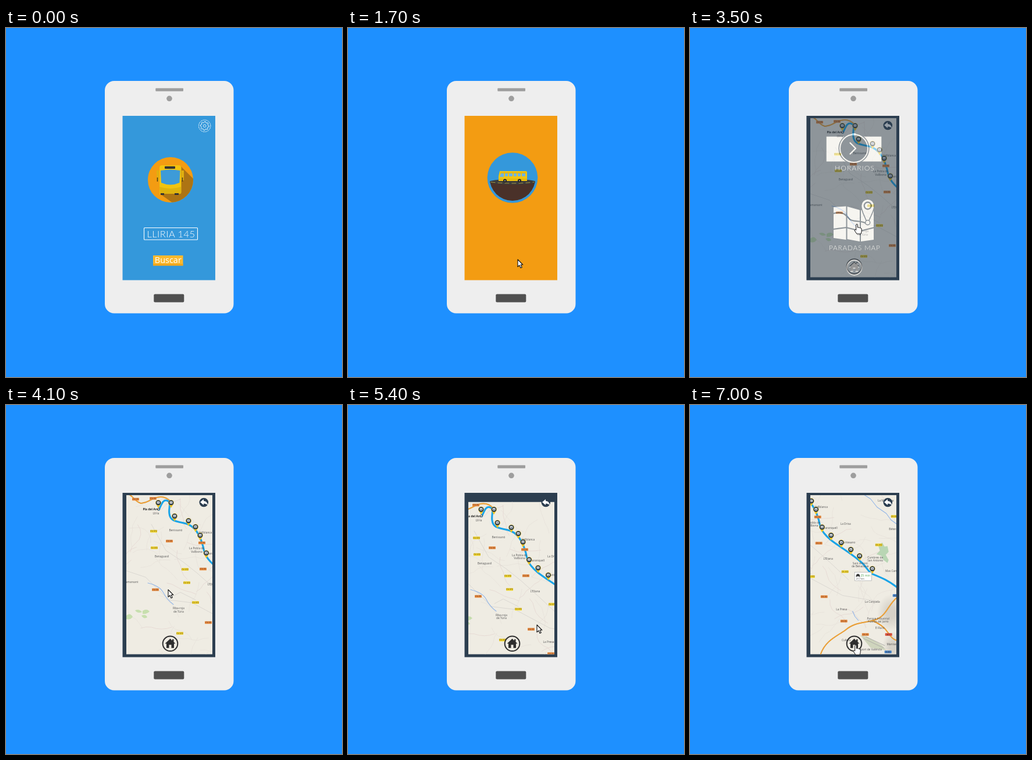
Recreate the animation shown at these times as an HTML page. Size 578x600 px, loop 7100 ms.

```html
<!DOCTYPE html>
<html lang="es">
<head>
<meta charset="utf-8">
<title>Bus app</title>
<style>
html, body { margin: 0; width: 100%; height: 100%; overflow: hidden; background: #1e90ff; }
svg { display: block; width: 100%; height: 100%; }
text { text-anchor: middle; }
.thin { font-family: Lato, sans-serif; font-weight: 300; fill: #fff; }
.place { font: 4.8px "Open Sans", sans-serif; fill: #555; }
.tag { font: 3.6px "Open Sans", sans-serif; fill: #533; }
.line { fill: none; stroke-linecap: round; stroke-linejoin: round; }
</style>
</head>
<body>
<svg viewBox="0 0 578 600">
  <defs>
    <clipPath id="badgeClip"><circle cx="283" cy="261" r="39"/></clipPath>
    <clipPath id="groundClip"><circle cx="283" cy="257.5" r="39.5"/></clipPath>
    <clipPath id="windowClip"><rect x="207" y="155" width="148" height="273.5"/></clipPath>
    <clipPath id="landClip"><rect x="190" y="155" width="300" height="340"/></clipPath>
    <radialGradient id="town">
      <stop offset=".3" stop-color="#d5d1c8"/>
      <stop offset="1" stop-color="#d5d1c8" stop-opacity="0"/>
    </radialGradient>
    <g id="house">
      <circle r="12.8" fill="none" stroke="currentColor" stroke-width="2"/>
      <path d="M-9 0L0-8.5 3.5-5.2V-7.5H6V-3L9 0H6.5V7.5H2V2H-2V7.5H-6.5V0Z" fill="currentColor"/>
    </g>
    <g id="pin">
      <path d="M-3.8 2.5L0 9 3.8 2.5Z" fill="#f5c518"/>
      <circle r="4.6" fill="#20303f" stroke="#e8c541" stroke-width=".7"/>
      <rect x="-2.4" y="-2.2" width="4.8" height="4" rx=".8" fill="#fff"/>
      <path d="M-1.6 0H1.6M-2 2.4H-1M1 2.4H2" stroke="#20303f" stroke-width="1"/>
    </g>
  </defs>

  <rect width="578" height="600" fill="#1e90ff"/>
  <rect x="170" y="91" width="221.5" height="399.5" rx="16" fill="#eee"/>
  <rect x="257.3" y="103.5" width="47.7" height="5.2" rx="1" fill="#9e9e9e"/>
  <circle cx="281" cy="121.3" r="4.8" fill="#9e9e9e"/>
  <rect x="254.3" y="457.5" width="52" height="14" rx="2" fill="#505050"/>

  <g id="home">
    <rect x="200.5" y="151" width="159.5" height="282.5" fill="#3498db"/>
    <g id="gear" transform="translate(341.7 168.3)" fill="none" stroke="#fff">
      <circle r="10.2" stroke-width=".9" stroke-dasharray="2 .8"/>
      <circle r="2.3" stroke-width=".8"/>
    </g>
    <circle cx="283" cy="261" r="39" fill="#f39c12"/>
    <path d="M300 237L345 282 300 310 266 286Z" fill="#ad7413" clip-path="url(#badgeClip)"/>
    <path d="M259 245H263V263H260ZM302 245H306V262H302Z" fill="#e0b010"/>
    <path d="M260.5 257V264M303.5 257V264" stroke="#4a3a18" stroke-width="1.5"/>
    <path d="M264 240Q264 236 269 236H297Q301.5 236 301.5 240V283Q301 285 299 285H266Q264 285 264 283Z" fill="#f1c40f"/>
    <path d="M266 245Q283 242 299.5 245L298.5 266Q283 273 267 266Z" fill="#3d9bd8"/>
    <path d="M264 273Q283 279 301 273V285H265Z" fill="#dfb40e"/>
    <rect x="273" y="237.7" width="18" height="4.3" rx="1" fill="#333"/>
    <path d="M266 284H272V287H266ZM290 284H297V287H290Z" fill="#333"/>
    <rect x="237.5" y="343.5" width="92" height="20.5" rx="1" fill="none" stroke="#fff" stroke-width="1.1"/>
    <text class="thin" x="284" y="360" font-size="16.5" letter-spacing=".4">LLIRIA 145</text>
    <rect x="253" y="391" width="51.5" height="17.5" fill="#fbb92f"/>
    <rect x="253" y="405.5" width="51.5" height="3" fill="#f0a51c"/>
    <text x="278.8" y="404" font-family="Open Sans, sans-serif" font-size="14.5" fill="#fff">Buscar</text>
  </g>

  <g id="loading">
    <rect x="200.5" y="151" width="159.5" height="282.5" fill="#f39c12"/>
    <circle cx="283" cy="257.5" r="43.3" fill="#3498db"/>
    <g clip-path="url(#groundClip)">
      <path d="M240 265H326V300H240Z" fill="#4a3129"/>
      <ellipse cx="283" cy="264.5" rx="40" ry="4.5" fill="#3c3c3c"/>
      <path d="M246 265Q283 269 320 265" class="line" stroke="#b9a23c" stroke-width=".9" stroke-dasharray="7 5"/>
      <g id="bus">
        <path d="M261 246H306Q308 246 308 249V263H259V255Z" fill="#f1c40f"/>
        <path d="M262 249H306M259 260H308" stroke="#d0a40c"/>
        <path d="M261 256L263 250H268V256ZM270 250H275V255H270ZM277 250H283V255H277ZM285 250H290V255H285ZM292 250H297V255H292ZM299 250H305V255H299Z" fill="#6fb5df"/>
        <circle cx="270" cy="262.5" r="3" fill="#222"/><circle cx="295" cy="262.5" r="3" fill="#222"/>
        <circle cx="270" cy="262.5" r="1.1" fill="#aaa"/><circle cx="295" cy="262.5" r="1.1" fill="#aaa"/>
      </g>
    </g>
  </g>

  <g id="menu">
    <rect x="200.5" y="151" width="159.5" height="282.5" fill="#2c3e50"/>
    <rect x="234.7" y="186.7" width="94.6" height="42.8" fill="#fff"/>
    <circle cx="282" cy="207" r="26.6" fill="#2c3e50"/>
    <circle cx="282" cy="207" r="24" fill="none" stroke="#fff" stroke-width="2"/>
    <rect x="278.5" y="181" width="7" height="3.5" rx="1.5" fill="#fff"/>
    <path class="line" d="M275.5 197.5L285 207 275.5 216.5" stroke="#fff" stroke-width="2.3"/>
    <text class="thin" x="283.4" y="245.3" font-size="12.3" letter-spacing=".9">HORARIOS</text>
    <path d="M247 308L268.5 306.5V364L247 361ZM270.5 307L292 313V367L270.5 363ZM294 313L316 306V364L294 367Z" fill="#fff"/>
    <path class="line" d="M246 319C262 314 268 321 274 328S294 329 305 337M246 346L269 343 293 349 317 343" stroke="#2c3e50" stroke-width="2.2"/>
    <path d="M305.5 337C301 324 294.5 315 294.5 305.5A11 11 0 0 1 317 305.5C317 315 310 324 305.5 337Z" fill="#fff" stroke="#2c3e50" stroke-width="1.6"/>
    <circle cx="305.7" cy="305.5" r="6" fill="none" stroke="#2c3e50" stroke-width="2.3"/>
    <circle cx="305.7" cy="334.5" r="4" fill="#fff" stroke="#2c3e50" stroke-width="1.5"/>
    <text class="thin" x="283.4" y="381.5" font-size="11.6" letter-spacing=".9">PARADAS MAP</text>
    <use href="#house" x="282.6" y="411.6" color="#fff"/>
  </g>

  <g id="mapScreen">
    <rect x="200.5" y="151" width="159.5" height="282.5" fill="#2c3e50"/>
    <g clip-path="url(#windowClip)"><g id="map" clip-path="url(#landClip)">
      <rect x="190" y="155" width="300" height="340" fill="#efece3"/>
      <g id="lanes" class="line"></g>
      <ellipse cx="463" cy="402" rx="24" ry="32" fill="url(#town)"/>
      <ellipse cx="466" cy="460" rx="18" ry="26" fill="url(#town)"/>
      <path d="M410 440L424 444 448 458 455 466 428 462Z" fill="#cfd5bd"/>
      <path class="line" d="M416 446L450 462M420 443L452 458" stroke="#b5b5ad" stroke-width="1.2"/>
      <path d="M207 362Q213 356 218 364 214 370 207 368ZM222 353Q229 350 234 356 226 359 222 353ZM235 354Q242 349 247 355 242 360 235 359ZM233 362Q241 359 243 365 237 369 233 362Z" fill="#c7dfae"/>
      <path d="M441 286L448 281 452 288 457 287 459 297 454 302 459 311 457 316 450 311 447 304 438 301 444 295Z" fill="#b9d6b4"/>
      <path class="line" d="M414 197L428 206 439 220 455 231 463 242 474 250M397 399L401 408 407 415M244 306Q265 311 271 323T288 343" stroke="#91b5e8" stroke-width="1.1"/>
      <g class="line" id="motorways"></g>
      <path class="line" d="M263 180C267 173 269 163 276 164C286 166 279 177 281 187C283 204 301 199 315 206C329 213 335 229 339 243C341 253 342 258 348 265C355 274 364 280 377 289C392 299 402 306 411 314C421 322 423 331 431 335C448 342 458 346 475 359" stroke="#18a4e8" stroke-width="3.1"/>
      <g id="tags"></g>
      <g id="places"></g>
      <g id="pins"></g>
      <circle cx="262.5" cy="179" r="1.7" fill="#fff" stroke="#222"/>
      <rect x="400.5" y="332" width="29" height="14.5" fill="#fff" stroke="#aaa" stroke-width=".7"/>
      <path d="M403 340V337.5L404.5 335H408L409.5 337.5V340H408V339H404.5V340Z" fill="#333"/>
      <text x="419" y="339.5" font-family="Open Sans, sans-serif" font-size="5.2" fill="#4b9d4b">25 min</text>
      <text x="410" y="344.5" font-family="Open Sans, sans-serif" font-size="3.8" fill="#333">27,7 km</text>
    </g></g>
    <circle cx="340.3" cy="167.5" r="7.8" fill="#2c3e50"/>
    <path d="M334 167L340 162V165Q346 165 347 172Q344 169 340 169.5V172Z" fill="#fff"/>
    <use href="#house" x="282.5" y="410.3" color="#2e2e2e"/>
  </g>

  <g id="cursor" stroke="#111" stroke-linejoin="round" fill="#fff">
    <path id="arrow" d="M0 0V12.5L2.9 9.8 5 14.5 7.2 13.5 5.1 9H8.8Z" stroke-width="1.1"/>
    <path id="hand" d="M-1.3 1Q0-1 1.4 1V6L3.3 5.7 4.3 6.5 5.8 6.2 6.6 7.2Q8.2 7 8.2 9V12.5L7 17H0L-4 11Q-4 9.2-2.3 9.6L-1.3 10.5Z" stroke-width="1"/>
  </g>
</svg>
<script>
const LOOP = 7100, STEP = 100;
const el = id => document.getElementById(id);

function add(parent, name, attrs, text) {
  const node = document.createElementNS('http://www.w3.org/2000/svg', name);
  for (const key in attrs) node.setAttribute(key, attrs[key]);
  if (text) node.textContent = text;
  el(parent).appendChild(node);
}

let seed = 23;
const random = () => (seed = seed * 16807 % 2147483647) / 2147483647;

// Faint country lanes: short seeded random walks.
for (let i = 0; i < 75; i++) {
  let x = 195 + random() * 280, y = 155 + random() * 325, angle = random() * 7, d = `M${x} ${y}`;
  for (let j = 0; j < 6; j++) {
    angle += random() - .5;
    d += `L${x += 9 * Math.cos(angle)} ${y += 9 * Math.sin(angle)}`;
  }
  add('lanes', 'path', { d, stroke: i % 4 ? '#e6e0d9' : '#e2d3cf', 'stroke-width': .7 });
}
add('lanes', 'path', { d: 'M250 205L275 250 305 270 330 290 358 315 390 345M207 285L240 296 280 335 320 340 380 372 440 382M285 330L300 322 326 335', stroke: '#d9d5d0', 'stroke-width': .9 });

const motorway = 'M210 153C220 157 220 165 232 169C248 168 251 158 266 158Q276 158 283 166M342 473C350 450 368 443 384 432C402 416 420 420 438 413C456 406 459 386 474 375M430 415Q449 422 458 436T475 449';
add('motorways', 'path', { d: motorway, stroke: '#d88d25', 'stroke-width': 2 });
add('motorways', 'path', { d: motorway, stroke: '#f2a53a', 'stroke-width': 1.3 });

function tags(color, label, spots) {
  for (const [x, y] of spots) {
    add('tags', 'rect', { x: x - 6, y: y - 2.2, width: 12, height: 4.4, rx: .6, fill: color });
    add('tags', 'text', { x, y: y + 1.3, class: 'tag' }, label);
  }
}
tags('#f2d92b', 'CV-372', [[254, 217], [255, 245.5], [308, 282.5], [311, 305.5], [326, 339.5], [299, 392.5], [384, 331], [442, 285], [469, 236]]);
tags('#e98a3c', 'CV-35', [[223, 162], [253, 160.5], [281, 234], [337, 237], [257, 317.5], [339, 282], [348, 374], [382, 416], [419, 439]]);
tags('#d9503c', 'A-7', [[459, 439]]);
tags('#3f7fc4', 'V-30', [[458, 469], [472, 372]]);

const places = [
  ['Llíria', 258, 188], ['Benissanó', 292, 217], ['Benaguasil', 268, 262],
  ['La Pobla de', 328, 248], ['Vallbona', 328, 253.5], ['Vilamarxant', 214, 306],
  ['Riba-roja', 297, 351], ['de Túria', 297, 356.5], ['Vallblanca', 343, 221],
  ['Benaranquell', 356, 257], ['La Drisa', 385, 250], ['Montesano', 389, 282],
  ["L'Eliana", 355, 310], ['Sant Antoni', 410, 318.5], ['de Benaixeve', 410, 323.5],
  ['Cumbres de', 436, 308], ['San Antonio', 436, 313.5], ['Mas Camarena', 470, 331],
  ['Bétera', 467, 259], ['La Presa', 378, 397.5], ['La Canyada', 431, 384.5],
  ['Parque Industrial', 441, 413.5], ['Fuente del Jarro', 441, 418.5], ['El Racó', 444, 429],
  ['Cullera', 386, 450], ['Manises', 465, 457], ['Aeroport de València', 424, 466],
  ['La Maimona', 454, 210], ['La Fla', 302, 460]
];
for (const [name, x, y] of places) add('places', 'text', { x, y, class: 'place' }, name);
add('places', 'text', { x: 248.5, y: 181, class: 'place', style: 'font-weight:700;fill:#222;font-size:5px' }, 'Pla del Arc');

const stops = [[262, 168], [284, 168], [290, 191], [314, 199], [326, 209.5], [334, 224], [344.5, 254.5], [360, 268.5], [377.5, 281], [394, 293], [409, 304], [431, 326]];
for (const [x, y] of stops) add('pins', 'use', { href: '#pin', x, y });

let cog = '';
for (let i = 0; i < 32; i++) {
  const r = i % 4 < 2 ? 7.6 : 5.8, a = i * Math.PI / 16;
  cog += `${i ? 'L' : 'M'}${r * Math.cos(a)} ${r * Math.sin(a)}`;
}
add('gear', 'path', { d: cog + 'Z', 'stroke-width': .9 });

// [time, x, y]
const cursorPath = [
  [100, 568, 588], [800, 345, 440], [1400, 292, 398], [2100, 292, 398], [2200, 296.5, 399.5],
  [2800, 296.5, 399.5], [3200, 287, 337], [3900, 287, 337], [4100, 279, 317.5], [4200, 279, 317.5],
  [4600, 318, 326], [5000, 285.5, 338], [5400, 325, 378], [5800, 266, 322], [5900, 266, 322],
  [6200, 300, 335], [6600, 274.5, 341], [7000, 285, 412.5]
];
const mapPath = [[4600, 0, 0], [5000, -33, 11.5], [5400, -33, 11.5], [5800, -92, -44.5], [6200, -92, -44.5], [6600, -117.3, -44.5]];
const handTimes = [[1300, 1600], [2200, 4000], [6900, 7100]];

function along(path, t) {
  const next = path.findIndex(p => p[0] > t);
  if (next === 0) return path[0].slice(1);
  if (next < 0) return path[path.length - 1].slice(1);
  const [t0, x0, y0] = path[next - 1], [t1, x1, y1] = path[next];
  const k = (t - t0) / (t1 - t0);
  return [x0 + (x1 - x0) * k, y0 + (y1 - y0) * k];
}
const move = (id, [x, y]) => el(id).setAttribute('transform', `translate(${x} ${y})`);
const show = (id, opacity) => {
  el(id).style.display = opacity ? '' : 'none';
  el(id).style.opacity = opacity;
};

function draw(now) {
  const t = Math.floor(now % LOOP / STEP) * STEP;
  show('home', +(t < 1600));
  show('loading', +(t >= 1600 && t < 2200));
  show('menu', t < 2100 || t >= 3600 ? 0 : t < 2200 ? .5 : 1);
  show('mapScreen', t < 3500 ? 0 : t < 3600 ? .5 : 1);
  show('cursor', +(t >= 100));
  const hand = handTimes.some(([from, to]) => t >= from && t < to);
  show('hand', +hand);
  show('arrow', +!hand);
  move('cursor', along(cursorPath, t));
  move('map', along(mapPath, t));
  move('bus', [(t - 1700) / 50, 0]);
}

const start = performance.now();
function tick() {
  draw(performance.now() - start);
  requestAnimationFrame(tick);
}
tick();
</script>
</body>
</html>
```
